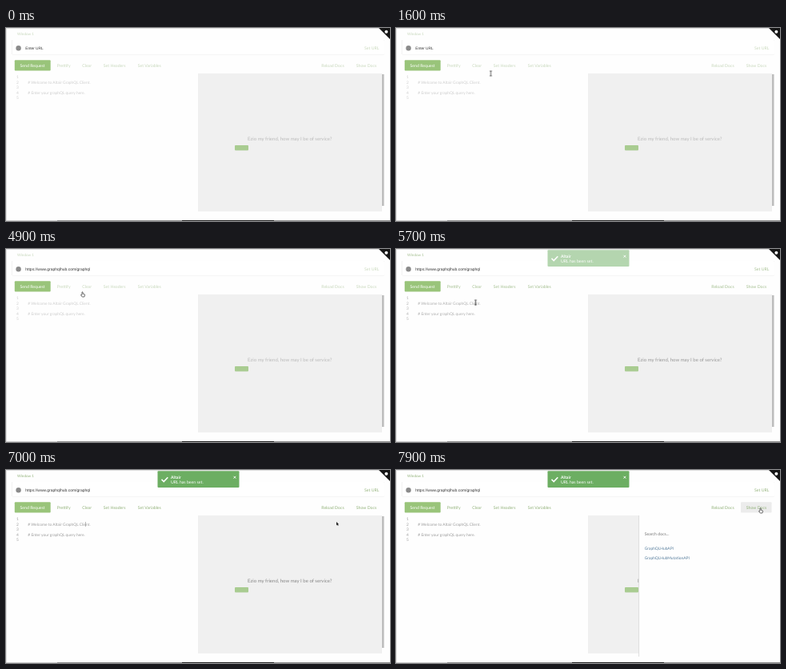
An HTML page for the animation above (8 s loop, 480 by 242 pixels).

```html
<!DOCTYPE html>
<html lang="en">
<head>
<meta charset="utf-8">
<title>GraphQL client</title>
<style>
html, body { margin: 0; width: 100%; height: 100%; overflow: hidden; background: #fefefe; }
svg { display: block; width: 480px; height: 242px; }
text { font: 5.2px Lato, sans-serif; text-rendering: geometricPrecision; }

.menu { fill: #92b27a; }
.code { font-size: 4.9px; fill: #9c9c9c; }
.field { font: 5px "Liberation Sans", sans-serif; fill: #333; }
.hint { font-size: 4.8px; }
.note { font-size: 6.06px; fill: #858585; }
.link { font-size: 4.9px; fill: #557c9c; }
.white { fill: #fff; }
.bold { font-weight: 700; }
.bar { filter: drop-shadow(0 .8px .7px #0003); }

/* every track shares one 8 s clock: 100 ms = 1.25% */
.dim, .toast, .mouse { animation: 8s linear infinite; }
.dim { animation-name: sharpen; }
.toast { animation-name: toast; }
.mouse { animation-name: move; }
.hint, .caret, .url, .edit, .hover, .docs, .beam, .hand, .arrow { opacity: 0; animation: 8s step-end infinite; }
.hint { animation-name: hint; }
.caret { animation-name: caret; }
.url { animation-name: url; }
.edit { animation-name: edit; }
.hover { animation-name: hover; }
.docs { animation-name: docs; }
.beam { animation-name: beam; }
.hand { animation-name: hand; }
.arrow { animation-name: arrow; }

@keyframes sharpen { 0%, 68.75% { opacity: .5 } 72.5%, 100% { opacity: 1 } }
@keyframes toast { 0%, 68.75% { opacity: 0 } 73.75%, 100% { opacity: 1 } }
@keyframes hint { 0% { opacity: 1 } 53.75%, 100% { opacity: 0 } }
@keyframes url { 0% { opacity: 0 } 53.75%, 100% { opacity: 1 } }
@keyframes caret {
  0% { opacity: 0 } 36.25% { opacity: 1 } 41.25% { opacity: 0 }
  47.5% { opacity: 1 } 53.75%, 100% { opacity: 0 }
}
@keyframes edit { 0% { opacity: 0 } 70% { opacity: 1 } 93.75%, 100% { opacity: 0 } }
@keyframes hover { 0% { opacity: 0 } 93.75%, 100% { opacity: 1 } }
@keyframes docs { 0% { opacity: 0 } 96.25%, 100% { opacity: 1 } }
@keyframes beam {
  0% { opacity: 0 } 16.25% { opacity: 1 } 58.75% { opacity: 0 }
  63.75% { opacity: 1 } 82.5%, 100% { opacity: 0 }
}
@keyframes hand {
  0% { opacity: 0 } 58.75% { opacity: 1 } 63.75% { opacity: 0 } 90%, 100% { opacity: 1 }
}
@keyframes arrow { 0% { opacity: 0 } 82.5% { opacity: 1 } 90%, 100% { opacity: 0 } }
@keyframes move {
  0%, 16.25% { transform: translate(140px, 190px); animation-timing-function: steps(3) }
  20%, 22.5% { transform: translate(118.5px, 57px); animation-timing-function: steps(2) }
  25%, 26.25% { transform: translate(100px, 16px); animation-timing-function: steps(2) }
  28.75%, 57.5% { transform: translate(99px, 27px); animation-timing-function: steps(3) }
  61.25% { transform: translate(96px, 57px); animation-timing-function: steps(6) }
  68.75%, 81.25% { transform: translate(99.5px, 67px); animation-timing-function: steps(3) }
  85% { transform: translate(290px, 82px); animation-timing-function: steps(2) }
  87.5% { transform: translate(414px, 67px); animation-timing-function: steps(2) }
  90% { transform: translate(452px, 43px); animation-timing-function: steps(2) }
  92.5%, 100% { transform: translate(456px, 51px) }
}
</style>
</head>
<body>
<svg viewBox="0 0 480 242">
  <rect width="480" height="242" fill="#fefefe"/>
  <path d="M0 .5H480M.5 0V242" stroke="#e0e0e0"/>
  <path d="M0 241.5H480" stroke="#ccc"/>
  <path d="M64 241.5H480" stroke="#909090"/>
  <path d="M220 241.5H335" stroke="#222"/>

  <rect class="bar" x="7.5" y="15" width="465.5" height="18.3" rx="1" fill="#fff"/>
  <circle cx="15.6" cy="25.2" r="3.2" fill="#8b8b8b"/>
  <text class="field hint" x="24.3" y="26.8">Enter URL</text>
  <text class="field url" x="24.3" y="26.8">https://www.graphqlhub.com/graphql</text>
  <path class="caret" d="M24.5 22V28" stroke="#444" stroke-width=".5"/>

  <rect x="10.8" y="40.3" width="44.9" height="13.2" rx="1" fill="#99c47a"/>
  <text class="white" x="17.5" y="48.6">Send Request</text>
  <rect class="hover" x="431" y="40.3" width="38.6" height="13.2" rx="1" fill="#ececec"/>

  <g class="dim">
    <g class="menu">
      <text x="14" y="8.6" style="font-size:4.6px">Window 1</text>
      <text x="448" y="26.8">Set URL</text>
      <text x="63.7" y="48.6">Prettify</text>
      <text x="95.2" y="48.6">Clear</text>
      <text x="121.8" y="48.6">Set Headers</text>
      <text x="164.8" y="48.6">Set Variables</text>
      <text x="394.3" y="48.6">Reload Docs</text>
      <text x="437.8" y="48.6">Show Docs</text>
    </g>
    <text class="code" x="13" y="63.3">1</text>
    <text class="code" x="13" y="69.8">2</text>
    <text class="code" x="13" y="76.2">3</text>
    <text class="code" x="13" y="82.7">4</text>
    <text class="code" x="13" y="89.1">5</text>
    <text class="code" x="27.3" y="69.8"># Welcome to Altair GraphQL Client.</text>
    <text class="code" x="27.3" y="82.7"># Enter your graphQL query here.</text>
  </g>
  <path class="edit" d="M99.7 65V71" stroke="#555" stroke-width=".5"/>

  <rect x="240" y="57" width="230" height="173" fill="#f0f0f0"/>
  <rect x="470" y="58" width="2.5" height="165" fill="#bcbcbc"/>
  <g class="dim"><text class="note" x="302" y="141.4">Ezio my friend, how may I be of service?</text></g>
  <rect x="286" y="147" width="17" height="6.6" rx="1" fill="#a9cc91"/>

  <g class="docs">
    <rect x="303.5" y="56" width="175.5" height="178" fill="#fefefe"/>
    <path d="M303.6 57V234" stroke="#d2d2d2" stroke-width=".7"/>
    <text x="310.7" y="82" fill="#777">Search docs...</text>
    <text class="link" x="310.7" y="99.7">GraphQLHubAPI</text>
    <text class="link" x="310.7" y="111.8">GraphQLHubMutationAPI</text>
  </g>

  <path d="M466 0H480V14Z" fill="#151515"/>
  <circle cx="475.4" cy="4.8" r="2" fill="#fff"/>

  <g class="toast">
    <rect x="189.5" y="1.2" width="102" height="20.8" rx="1" fill="#6cae62"/>
    <path d="M194.5 11.8L197.2 14.5L202.3 9.2" fill="none" stroke="#fff" stroke-width="1.6"/>
    <text class="white bold" x="206" y="11">Altair</text>
    <text class="white" x="206" y="16.7">URL has been set.</text>
    <path d="M284.5 7.8L287.3 10.6M287.3 7.8L284.5 10.6" stroke="#fff" stroke-width=".9"/>
  </g>

  <g class="mouse">
    <path class="beam" d="M-1.3 -3H1.3M0 -3V3M-1.3 3H1.3" stroke="#333" stroke-width=".8"/>
    <path class="hand" d="M-1 -3Q-.4 -3.6 .1 -2.8V-.9L2 -.4Q2.7 -.2 2.5 .8L1.9 3H-.8L-2.5 .6Q-2.3 -.2 -1 .4Z" fill="#fff" stroke="#333" stroke-width=".7"/>
    <path class="arrow" d="M-1 -2V2.4L.1 1.5L.9 3L1.6 2.6L.9 1.2H2.2Z" fill="#222"/>
  </g>
</svg>
</body>
</html>
```
